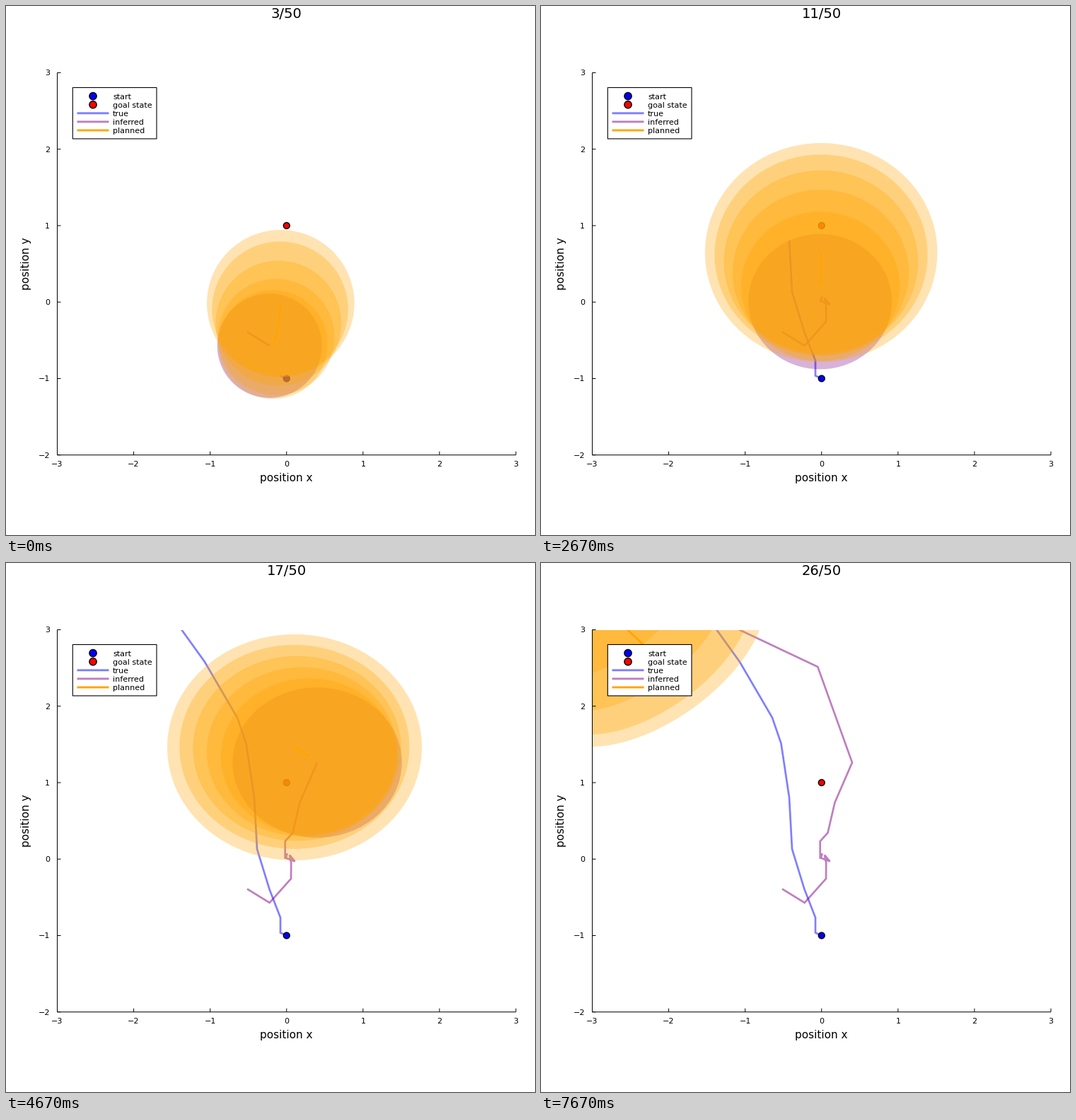
A matplotlib script that plays this animation: 748x749 px, repeating every 8000 ms.

```python
import math

import numpy as np
import matplotlib.pyplot as plt
from matplotlib.animation import FuncAnimation
from matplotlib.patches import Circle, Ellipse, Rectangle

W, H, DPI = 748, 749, 100
PX = 72 / DPI                      # points per pixel
LEFT, RIGHT, TOP, BOTTOM = 72.5, 721, 94.5, 635.7
FIRST, STEPS, HORIZON = 3, 24, 5
LOOP, INTERVAL = 8000, 40
LINE = 2.7 * PX

plt.rcParams["font.family"] = "DejaVu Sans"

# Key points in pixels, by step; steps in between are interpolated.
TRUE_KEYS = {1: (397, 527.4), 2: (388, 523.5), 4: (388, 502), 6: (372.5, 462),
             8: (355, 405), 10: (351, 332), 12: (339.5, 255.5), 13: (327, 219),
             15: (281, 140), 16: (235, 76)}
INFERRED_KEYS = {1: (341, 461.5), 2: (372.7, 481), 3: (403, 447), 4: (403.2, 424.5),
                 5: (401, 413.5), 6: (408.5, 422.5), 8: (395.5, 417.5),
                 9: (397.5, 411.5), 10: (394.7, 418.5), 12: (394.7, 394),
                 14: (405.5, 382), 15: (415.5, 339), 16: (440, 282.5),
                 17: (391.3, 147), 18: (273, 91), 25: (-10, -30)}
# Last planned belief: x, y, x radius, y radius.
PLAN_KEYS = {3: (388.3, 421, 104.3, 104), 5: (400, 354, 109, 108.5),
             9: (396.3, 352, 144.5, 141), 13: (396, 346, 184, 169),
             15: (400.7, 337, 191.7, 176), 17: (408, 261, 180, 160),
             18: (366, 96, 165, 145), 19: (253, 80, 148, 94),
             23: (215, 75, 150, 100), 26: (160, 130, 157, 130)}


def keyed(step, keys):
    return np.array([np.interp(step, list(keys), column)
                     for column in zip(*keys.values())])


def path(keys, length):
    return keyed(np.arange(1, length + 1), keys)


def inferred_belief(k):
    shrink = np.interp(k, [3, 5, 9, 15], [0.71, 0.605, 0.595, 0.665])
    return np.append(keyed(k - 1, INFERRED_KEYS), shrink * keyed(k, PLAN_KEYS)[2:])


def planned_beliefs(k):
    """Spread from the inferred belief to the last planned one."""
    start = inferred_belief(k)
    span = keyed(k, PLAN_KEYS) - start
    u = np.arange(1, HORIZON + 1) / HORIZON
    ease = np.sin(u * math.pi / 2)
    ease_y = ease ** (1 + 2 * math.exp(-2 * (k - FIRST)))
    grow = u ** np.interp(k, [3, 5, 9, 15, 19, 23], [1.4, 1.25, 1.12, 1.06, 2, 1.1])
    beliefs = start + span * np.column_stack([ease, ease_y, grow, grow])
    overshoot = np.interp(k, [16, 19, 23], [0, -8, 0])
    beliefs[:, :2] += (4 * overshoot * u * (1 - u))[:, None]
    return beliefs


def to_px(x, y):
    return LEFT + (x + 3) * (RIGHT - LEFT) / 6, BOTTOM - (y + 2) * (BOTTOM - TOP) / 5


fig = plt.figure(figsize=(W / DPI, H / DPI), dpi=DPI, facecolor="white")
ax = fig.add_axes([0, 0, 1, 1])
ax.set_xlim(0, W)
ax.set_ylim(H, 0)
ax.axis("off")
plot_area = Rectangle((LEFT, TOP), RIGHT - LEFT, BOTTOM - TOP, transform=ax.transData)


def line(xs, ys, color, width=LINE, z=1, alpha=1, clip=False):
    artist, = ax.plot(xs, ys, color=color, lw=width, alpha=alpha, zorder=z, snap=False,
                      solid_capstyle="butt", solid_joinstyle="miter")
    if clip:
        artist.set_clip_path(plot_area)
    return artist


def label(x, y, text, size, ha="center", **kw):
    return ax.text(x, y, text, fontsize=size, ha=ha, va="baseline", zorder=12, **kw)


def dot(x, y, color, radius, z):
    ax.add_patch(Circle((x, y), radius, fc=color, ec="black", lw=1.4 * PX, zorder=z))


def belief(color, z):
    patch = Ellipse((0, 0), 1, 1, fc=color, alpha=0.3, lw=0, zorder=z)
    ax.add_patch(patch)
    patch.set_clip_path(plot_area)
    return patch


def place(patch, values, corr):
    """Fit the ellipse to a covariance with the given spreads and correlation."""
    x, y, rx, ry = values
    cross = corr * rx * ry
    sizes, axes = np.linalg.eigh([[rx * rx, cross], [cross, ry * ry]])
    patch.set_center((x, y))
    patch.width, patch.height = 2 * np.sqrt(sizes)
    patch.angle = math.degrees(math.atan2(axes[1, 0], axes[0, 0]))


def draw_axes():
    line([LEFT, LEFT], [TOP, BOTTOM], "black", PX, 8)
    line([LEFT, RIGHT], [BOTTOM, BOTTOM], "black", PX, 8)
    for v in range(-3, 4):
        text = str(v).replace("-", "\u2212")
        x, y = to_px(v, v)
        line([x, x], [BOTTOM, BOTTOM - 5], "black", PX, 8)
        label(x, 652, text, 8)
        if v >= -2:
            line([LEFT, LEFT + 5], [y, y], "black", PX, 8)
            label(62.3, y + 4, text, 8, "right")
    label(396.75, 672.5, "position x", 11)
    label(33.3, 365, "position y", 11, rotation=90, rotation_mode="anchor")


def draw_legend():
    ax.add_patch(Rectangle((94.3, 115.5), 118.7, 72.5, fc="white", ec="black",
                           lw=1.1 * PX, zorder=10, snap=False))
    entries = [("start", "blue", 1), ("goal state", "red", 1), ("true", "blue", 0.5),
               ("inferred", "purple", 0.5), ("planned", "orange", 1)]
    for i, (name, color, alpha) in enumerate(entries):
        y = 127.6 + 12.1 * i
        if i < 2:
            dot(123, y, color, 5.1, 11)
        else:
            line([100.5, 145.5], [y, y], color, 2.9 * PX, 11, alpha)
        label(151, y + 4, name, 8, "left")


draw_axes()
draw_legend()
dot(*to_px(0, -1), "blue", 4.4, 3)
dot(*to_px(0, 1), "red", 4.4, 3)

true_line = line([], [], "blue", z=1, alpha=0.5, clip=True)
inferred_line = line([], [], "purple", z=2, alpha=0.5, clip=True)
inferred_patch = belief("purple", 4)
planned_patches = [belief("orange", 5) for _ in range(HORIZON)]
planned_line = line([], [], "orange", z=6, clip=True)
title = label(396.75, 17, "", 14)


def update(frame):
    # A step shows in the tick during which it begins.
    k = FIRST + ((frame + 1) * INTERVAL - 1) * STEPS // LOOP
    title.set_text(f"{k}/50")
    true_line.set_data(*path(TRUE_KEYS, min(k - 1, max(TRUE_KEYS))))
    inferred_line.set_data(*path(INFERRED_KEYS, k - 1))
    corr = -0.08 * max(0, k - 19)
    place(inferred_patch, inferred_belief(k), corr)
    beliefs = planned_beliefs(k)
    for patch, values in zip(planned_patches, beliefs):
        place(patch, values, corr)
    planned_line.set_data(*beliefs[:, :2].T)
    return [title, true_line, inferred_line, inferred_patch, *planned_patches, planned_line]


anim = FuncAnimation(fig, update, frames=LOOP // INTERVAL, interval=INTERVAL,
                     repeat=True, repeat_delay=0, blit=False)
plt.show()
```
